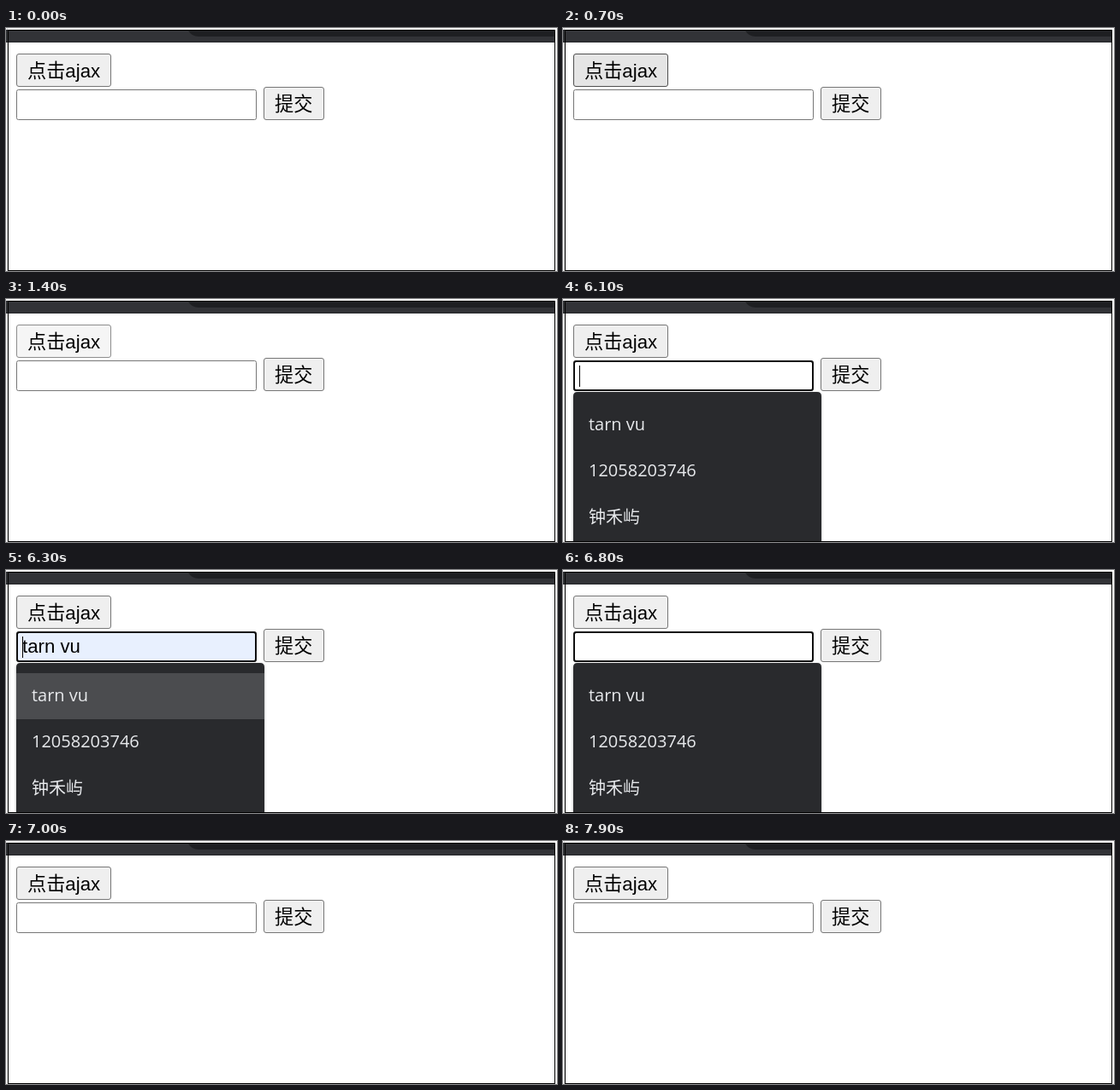
These frames come from a looping animation (644x285 px, 8000 ms). An HTML page:

```html
<!DOCTYPE html>
<html lang="zh-CN">
<head>
<meta charset="utf-8">
<title>ajax form</title>
<style>
  html, body { margin: 0; width: 100%; height: 100%; overflow: hidden; background: #fff; }
  svg { display: block; width: 644px; height: 285px; }
  text { font: 22.2px "Liberation Sans", "Noto Sans CJK SC", "Noto Sans CJK", sans-serif; fill: #000; }
  .list text { font: 20px "Open Sans", "Noto Sans CJK SC", "Noto Sans CJK", sans-serif; fill: #e8eaed; }
  .button { fill: #efefef; stroke: #767676; }
  .field { fill: #fff; stroke: #767676; }
  .focus { fill: #fff; stroke: #101010; stroke-width: 2; }
  .list { filter: drop-shadow(0 1px 1.5px rgba(0, 0, 0, .35)); }
  .press, .open, .caret, .pick, .fill, .edge { animation: 8s step-end infinite; }
  .press { animation-name: press; }
  .open { animation-name: open; }
  .caret { animation-name: caret; }
  .pick { animation-name: pick; }
  .fill { animation-name: fill; }
  .edge { animation-name: edge; }

  /* hover, hold while the request blocks, release */
  @keyframes press {
    0%, 76.25% { fill: #efefef; stroke: #767676; }
    8.75% { fill: #e5e5e5; stroke: #4f4f4f; }
    17.5% { fill: #f5f5f5; stroke: #8d8d8d; }
  }
  @keyframes open {
    0%, 87.5% { visibility: hidden; }
    76.25% { visibility: visible; }
  }
  @keyframes caret {
    0%, 85% { visibility: hidden; }
    76.25% { visibility: visible; }
  }
  @keyframes pick {
    0%, 85% { visibility: hidden; }
    78.75% { visibility: visible; }
  }
  @keyframes fill {
    0%, 85% { fill: #fff; }
    78.75% { fill: #e8f0fe; }
  }
  @keyframes edge {
    0%, 98.75% { fill: #d4d4d4; }
    17.5% { fill: #ececec; }
  }
</style>
</head>
<body>
<svg viewBox="0 0 644 285">
  <rect width="644" height="285" fill="#fff"/>
  <rect class="edge" x="1" width="1" height="285"/>

  <!-- browser strip -->
  <rect y="2" width="642" height="15" fill="#323337"/>
  <path d="M213 3H642V10H225Q217 10 213 3Z" fill="#1e1f22"/>
  <rect y="16" width="642" height="1" fill="#242529"/>

  <rect class="button press" x="12.5" y="30.5" width="110" height="38" rx="2.5"/>
  <text x="25" y="58">点击ajax</text>

  <rect class="field" x="12.5" y="72.5" width="280" height="35" rx="2"/>
  <rect class="button" x="301.5" y="69.5" width="70" height="38" rx="2.5"/>
  <text x="314" y="97">提交</text>

  <g class="open">
    <rect class="focus fill" x="13" y="73" width="279" height="34" rx="2.5"/>
  </g>
  <text class="pick" x="19" y="97">tarn vu</text>
  <rect class="caret" x="19" y="78" width="1" height="25"/>

  <g class="list open">
    <path d="M12 285V114Q12 109 17 109H297Q302 109 302 114V285Z" fill="#292a2d"/>
    <rect class="pick" x="12" y="121" width="290" height="54" fill="#4b4c4f"/>
    <text x="30" y="154">tarn vu</text>
    <text x="30" y="208">12058203746</text>
    <text x="30" y="263">钟禾屿</text>
  </g>

  <!-- window frame -->
  <rect x="2.5" y="2.5" width="639" height="282" fill="none" stroke="#000"/>
</svg>
</body>
</html>
```
